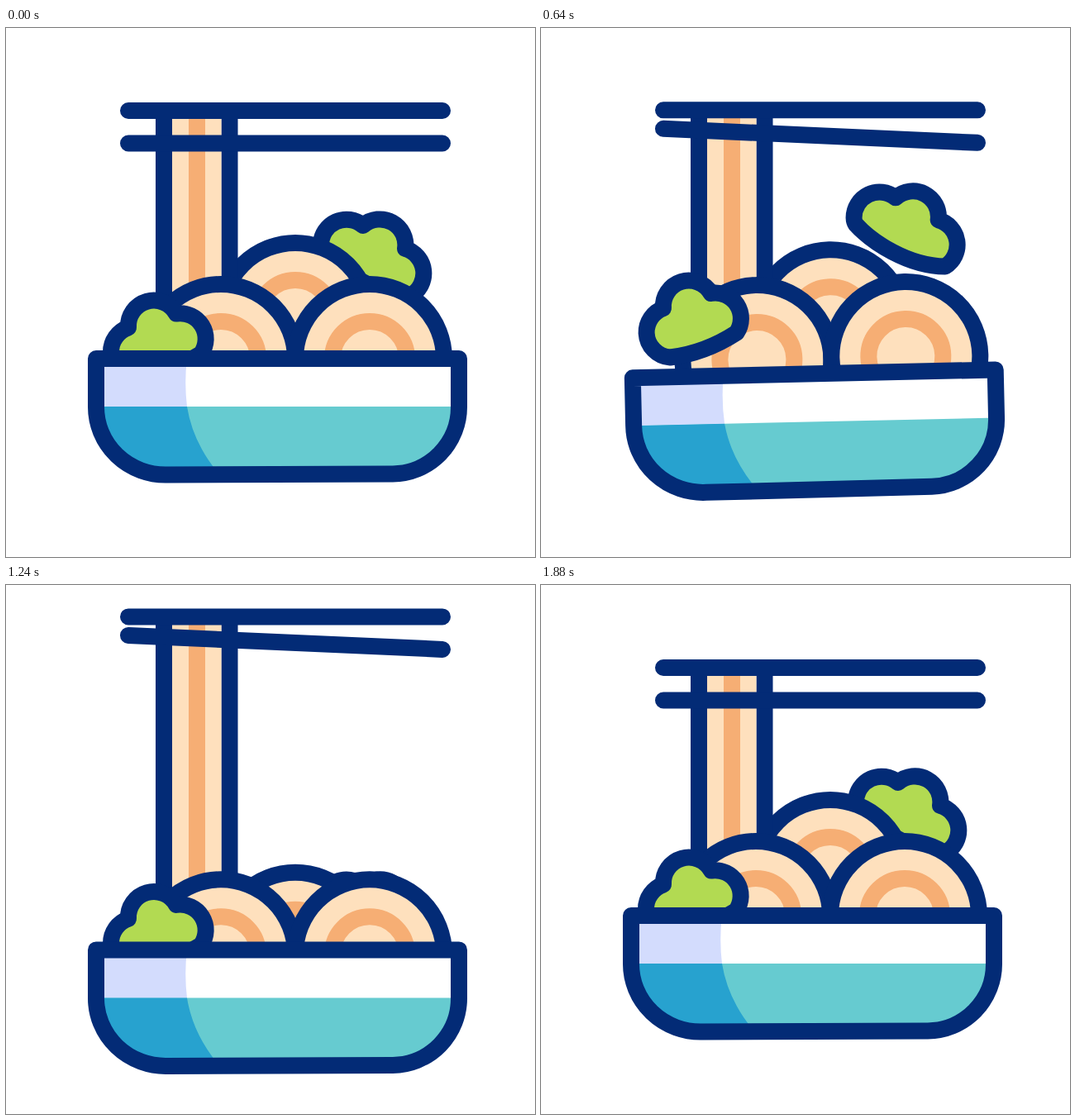
Recreate the animation shown at these times as an HTML page. Size 640 px wide and 640 px high, loop 2.08 s.

```html
<!DOCTYPE html>
<html lang="en">
<head>
<meta charset="utf-8">
<title>Noodle bowl</title>
<style>
  html, body { margin: 0; width: 100%; height: 100%; overflow: hidden; background: #fff; }
  svg { display: block; width: 100%; height: 100%; }
  .line { fill: none; stroke: #032b76; stroke-width: 20; stroke-linecap: round; stroke-linejoin: round; }
  .line.leaf { fill: #b2da52; }
  .line.dough { fill: #fee0bd; }
  .swirl { fill: none; stroke: #f6ae74; stroke-width: 20; }
</style>
</head>
<body>
<svg viewBox="0 0 640 640">
  <defs>
    <g id="ball">
      <circle class="line dough" r="90"/>
      <circle class="swirl" r="45"/>
    </g>
    <path id="shell" d="M109 400V458A84 82 0 0 0 195 540.5L468 539.5A81 81 0 0 0 548 458V400Z"/>
    <clipPath id="inside"><use href="#shell"/></clipPath>
  </defs>

  <g class="tilt">
    <path id="leafR" class="line leaf" d="M381 262A31 31 0 0 1 432 239A31 31 0 0 1 483 267A31 31 0 0 1 490 323.5C445 322 402 292 383 270Q381 267 381 262Z"/>
    <use id="back" href="#ball"/>
  </g>

  <g id="strand">
    <path class="line dough" style="stroke-linecap:butt" d="M191 0V600M270.5 0V600"/>
    <rect x="201" width="59.5" height="600" fill="#fee0bd"/>
    <path class="swirl" d="M231 0V600"/>
  </g>

  <g class="tilt">
    <g id="front">
      <use href="#ball" x="260" y="400"/>
      <use href="#ball" x="440" y="400"/>
    </g>
    <path id="leafL" class="line leaf" d="M127 392A31 31 0 0 1 148 362.5A31 31 0 0 1 206 345.5A31 31 0 0 1 236 394C215 407 187 419 155 422A31 31 0 0 1 127 392Z"/>
    <g clip-path="url(#inside)">
      <path fill="#fff" d="M90 390H570V560H90Z"/>
      <path fill="#66cbd0" d="M90 458H570V560H90Z"/>
      <path fill="#d3dcfd" d="M90 400H219Q215.5 429 219 458H90Z"/>
      <path fill="#27a2cf" d="M90 458H219Q226 502 258 540V560H90Z"/>
    </g>
    <use href="#shell" class="line"/>
  </g>

  <path id="sticks" class="line"/>
</svg>
<script>
const LOOP = 2080;
const el = id => document.getElementById(id);
const tilts = document.querySelectorAll('.tilt');
const move = (id, x, y) => el(id).setAttribute('transform', `translate(${x} ${y})`);

function draw(now) {
  const t = now % LOOP;
  // Smooth step from 0 to 1 between two times
  const ease = (from, to) => {
    const u = Math.min(1, Math.max(0, (t - from) / (to - from)));
    return u * u * (3 - 2 * u);
  };

  // The bowl rocks right, then left, while it sinks and returns
  const back = ease(1095, 1803);
  const angle = 10.35 * ease(0, 405) - 16.3 * ease(405, 770) + 5.95 * ease(770, 1120);
  const drop = 46.5 * (ease(299, 1089) - back);
  for (const g of tilts) g.setAttribute('transform', `translate(0 ${drop}) rotate(${angle} 320 320)`);

  // The filling is tossed up, falls in and settles
  const toss = ease(330, 765), fall = ease(765, 1100);
  move('front', 0, -20 * ease(300, 700) + 29 * ease(700, 1100) - 9 * ease(1100, 1400));
  move('back', 350, 350 - 12 * toss + 75 * fall - 63 * ease(1120, 1480));
  move('leafL', 0, -57 * (toss - ease(765, 1200)));
  move('leafR', 0, -62 * toss + 147 * fall - 85 * ease(1210, 1600));

  // The sticks dip, pinch, lift and let go; the strand ends behind the bowl
  const top = 100 + 34.5 * ease(0, 356) - 103.7 * ease(356, 1085) + 69.2 * back;
  const gap = 39.5 - 17 * (ease(360, 560) - ease(1650, 1885));
  el('strand').setAttribute('transform', `translate(0 ${top}) scale(1 ${(430 + drop - top) / 600})`);
  el('sticks').setAttribute('d', `M148 ${top}H528M148 ${top + gap}L528 ${top + 39.5}`);
}

const start = performance.now();
function frame() {
  draw(performance.now() - start);
  requestAnimationFrame(frame);
}
frame();
</script>
</body>
</html>
```
